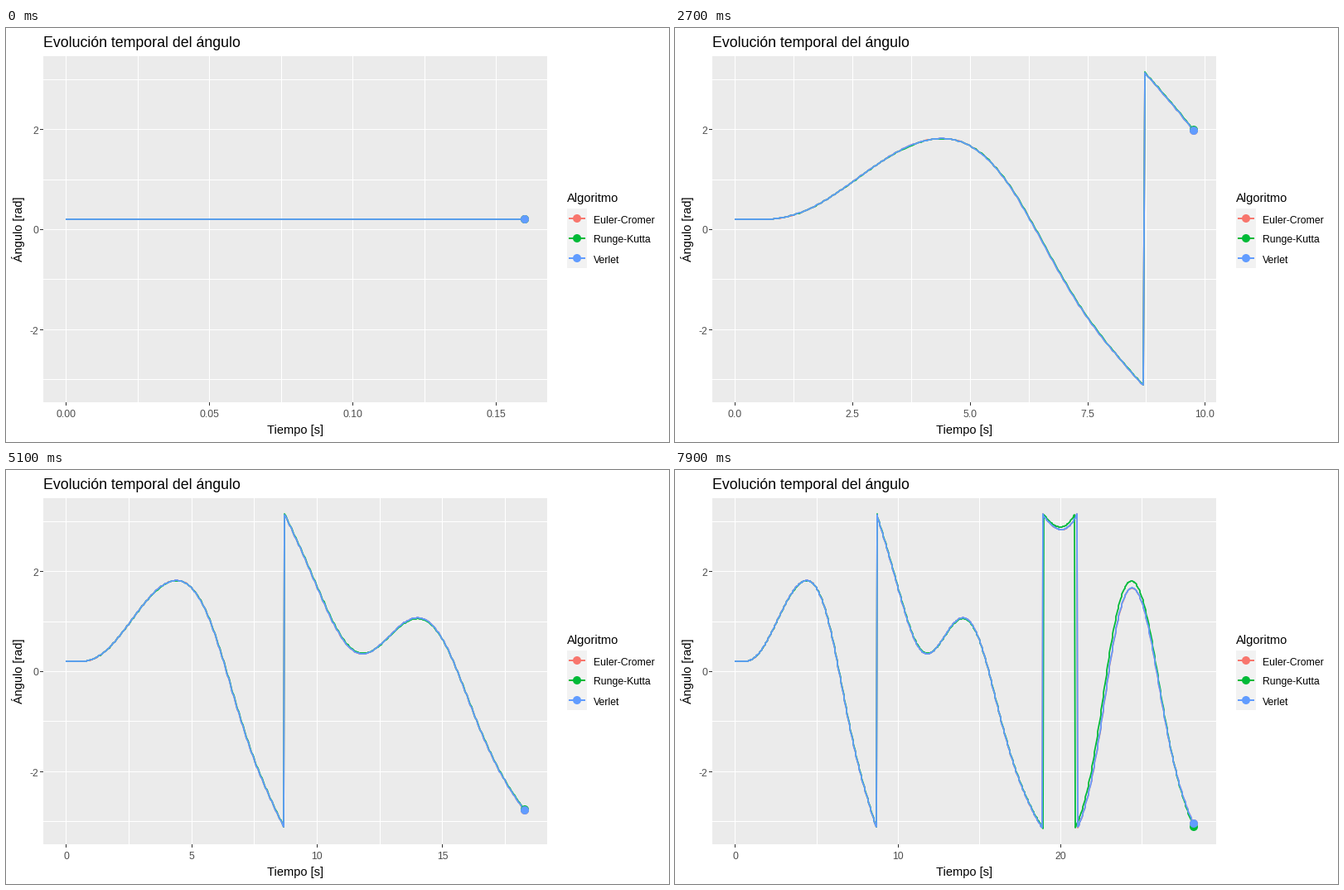
A matplotlib script for the animation above (8000 ms loop, 800x500 px).

```python
import math

import matplotlib.pyplot as plt
import numpy as np
from matplotlib.animation import FuncAnimation
from matplotlib.patches import Circle, Rectangle

plt.rcParams["font.family"] = "Liberation Sans"

W, H, DPI = 800, 500, 100
PX = 72 / DPI
FRAMES, INTERVAL = 80, 100
LEFT, TOP, RIGHT, BOTTOM = 44.8, 34, 653.4, 452
DT, STEPS, ROWS_PER_FRAME = 0.04, 720, 8.875
RED, GREEN, BLUE = "#F8766D", "#00BA38", "#619CFF"
DARK, GRAY = "#333333", "#4D4D4D"


# Driven, damped pendulum solved with three integrators
def accel(th, w, t):
    return -math.sin(th) - 0.5 * w + 1.2 * math.sin(2 * t / 3)


def euler_cromer():
    th, w, out = 0.2, 0.0, [0.2]
    for i in range(STEPS):
        w += accel(th, w, i * DT) * DT
        th += w * DT
        out.append(th)
    return out


def runge_kutta():
    def deriv(s, t):
        return np.array([s[1], accel(s[0], s[1], t)])

    s, out = np.array([0.2, 0.0]), [0.2]
    for i in range(STEPS):
        t = i * DT
        k1 = deriv(s, t)
        k2 = deriv(s + k1 * DT / 2, t + DT / 2)
        k3 = deriv(s + k2 * DT / 2, t + DT / 2)
        k4 = deriv(s + k3 * DT, t + DT)
        s = s + (k1 + 2 * k2 + 2 * k3 + k4) * DT / 6
        out.append(s[0])
    return out


def verlet():
    out = [0.2, 0.2 + accel(0.2, 0, 0) * DT ** 2 / 2]
    for i in range(1, STEPS):
        a, b = out[-2:]
        out.append(2 * b - a + accel(b, (b - a) / DT, i * DT) * DT ** 2)
    return out


def wrap(th):
    return (np.array(th) + np.pi) % (2 * np.pi) - np.pi


# Axis breaks by the extended Wilkinson rule
def find_breaks(lo, hi, m=5):
    nice = [1, 5, 2, 2.5, 4, 3]
    best, found = -9, None
    for j in (1, 2):
        for qi, q in enumerate(nice):
            for k in range(2, 10):
                z0 = math.ceil(math.log10((hi - lo) / (k + 1) / j / q))
                for z in (z0, z0 + 1):
                    step = j * q * 10.0 ** z
                    first = (math.floor(hi / step) - k + 1) * j
                    last = math.ceil(lo / step) * j
                    for start in range(first, last + 1):
                        a = start * step / j
                        b = a + step * (k - 1)
                        zero = start % j == 0 and a <= 0 <= b
                        simple = 1 - qi / 5 - j + zero
                        cover = 1 - 50 * ((hi - b) ** 2 + (lo - a) ** 2) / (hi - lo) ** 2
                        ratio = (k - 1) / (b - a) * (max(b, hi) - min(a, lo)) / (m - 1)
                        dense = 2 - max(ratio, 1 / ratio)
                        score = 0.25 * simple + 0.2 * cover + 0.5 * dense
                        if score > best + 1e-9:
                            best, found = score, (a, step, k)
    a, step, k = found
    return a + step * np.arange(k), step


def fmt(values):
    d = next(d for d in range(5) if np.allclose(values, np.round(values, d), atol=1e-7))
    return [f"{abs(v) if abs(v) < 1e-9 else v:.{d}f}" for v in values]


time = np.arange(STEPS + 1) * DT
series = [(wrap(euler_cromer()), RED), (wrap(runge_kutta()), GREEN), (wrap(verlet()), BLUE)]


def y_px(v):
    return (TOP + BOTTOM) / 2 - np.asarray(v) * (BOTTOM - TOP) / (2.2 * np.pi)


def x_px(t, tmax):
    span = (RIGHT - LEFT) / 1.1
    return LEFT + span * 0.05 + span * np.asarray(t) / tmax


fig = plt.figure(figsize=(W / DPI, H / DPI), dpi=DPI, facecolor="white")
ax = fig.add_axes([0, 0, 1, 1])
ax.set_xlim(0, W)
ax.set_ylim(H, 0)
ax.axis("off")


def box(x, y, w, h, color):
    ax.add_patch(Rectangle((x, y), w, h, fc=color, lw=0, zorder=0))


def line(color, width, z, x=(), y=()):
    return ax.plot(x, y, color=color, lw=width * PX, zorder=z, snap=False,
                   solid_capstyle="butt")[0]


def dot(x, y, color, z):
    return ax.add_patch(Circle((x, y), 5, fc=color, lw=0, zorder=z))


def label(x, y, s, size, color="black", **kw):
    return ax.text(x, y, s, fontsize=size * PX, color=color, va="baseline", **kw)


def bars(xs, y0, y1):
    """Vertical one-pixel strokes joined into a single broken line."""
    x = np.repeat(np.round(xs) + 0.5, 3)
    y = np.tile([y0, y1, np.nan], len(xs))
    return x, y


box(45, TOP, 608, BOTTOM - TOP, "#EBEBEB")
for v in range(-3, 4):
    y = np.round(y_px(v)) + 0.5
    line("white", 1, 1, (45, 653), (y, y))
    if v % 2 == 0:
        line(DARK, 1, 1, (41, 45), (y, y))
        label(39, y + 5, str(v), 12.3, GRAY, ha="right")

label(45, 23, "Evolución temporal del ángulo", 17.8)
label(349, 490, "Tiempo [s]", 14.67, ha="center")
label(20, 243, "Ángulo [rad]", 14.5, ha="center", rotation=90, rotation_mode="anchor")
label(677, 210, "Algoritmo", 14.67)
for i, (name, color) in enumerate([("Euler-Cromer", RED), ("Runge-Kutta", GREEN), ("Verlet", BLUE)]):
    y = 230 + 24 * i
    box(677, y - 12, 24, 24, "#F2F2F2")
    line(color, 2, 2, (679, 699), (y, y))
    dot(689, y, color, 3)
    label(709, y + 5.5, name, 12.3)

grid = line("white", 1, 1)
ticks = line(DARK, 1, 1)
names = [label(0, 470, "", 12.3, GRAY, ha="center") for _ in range(10)]
curves = [line(c, 1.8, 3) for _, c in series]
heads = [dot(0, 0, c, 4) for _, c in series]


def update(i):
    n = int((i + 0.5) * ROWS_PER_FRAME)
    tmax = time[n]
    lo, hi = -0.05 * tmax, 1.05 * tmax
    breaks, step = find_breaks(lo, hi)
    halves = breaks[0] + step * (np.arange(2 * len(breaks) + 2) - 1) / 2
    inside = [h for h in halves if lo <= h <= hi]
    major = np.array([b for b in breaks if lo <= b <= hi])

    grid.set_data(*bars(x_px(inside, tmax), TOP, BOTTOM))
    xs = x_px(major, tmax)
    ticks.set_data(*bars(xs, BOTTOM, BOTTOM + 4))
    texts = fmt(major)
    for k, name in enumerate(names):
        shown = k < len(texts)
        name.set_text(texts[k] if shown else "")
        name.set_x(xs[k] if shown else 0)

    # Curve vertices sit on whole pixels
    x = np.round(x_px(time[:n + 1], tmax))
    for (th, _), curve, head in zip(series, curves, heads):
        y = np.round(y_px(th[:n + 1]))
        curve.set_data(x, y)
        head.center = (x[-1], y[-1])
    return [grid, ticks, *names, *curves, *heads]


anim = FuncAnimation(fig, update, frames=FRAMES, interval=INTERVAL, repeat=True)
plt.show()
```
